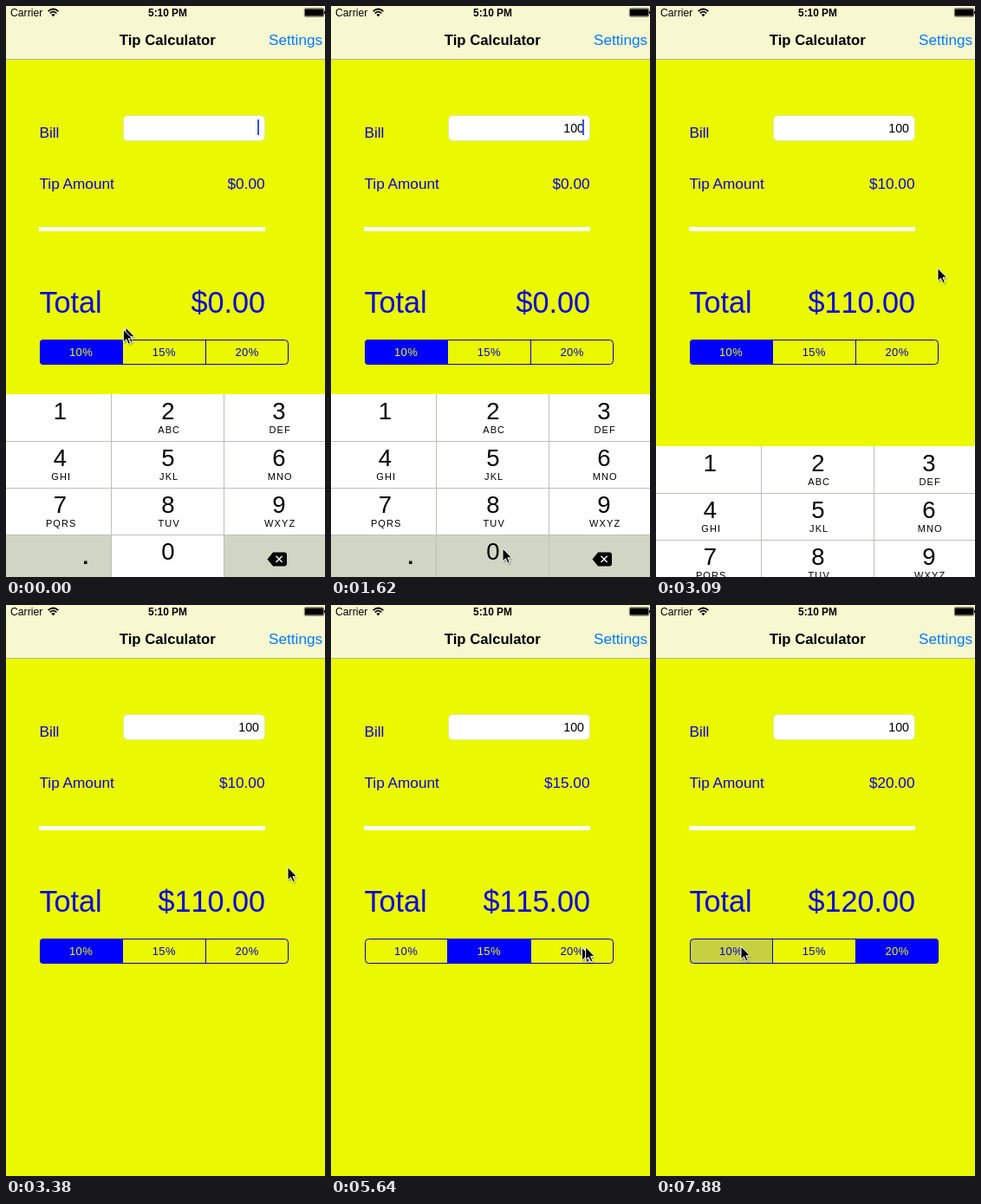
Recreate the animation shown at these times as an HTML page. Size 368 by 659 pixels, loop 8000 ms.

```html
<!DOCTYPE html>
<html lang="en">
<head>
<meta charset="utf-8">
<title>Tip Calculator</title>
<style>
html, body { margin: 0; width: 100%; height: 100%; overflow: hidden; background: #ebf900; }
svg { display: block; width: 100vw; height: 100vh; }
text { font-family: "Liberation Sans", Arial, sans-serif; }
.num { font-kerning: none; }
.end { text-anchor: end; }
.mid { text-anchor: middle; }
.label { font-size: 17.2px; fill: #0a00dc; }
.big { font-size: 34.2px; fill: #0a00dc; }
</style>
</head>
<body>
<svg viewBox="0 0 368 659">
  <defs>
    <clipPath id="segClip"><rect x="39" y="385" width="287" height="29" rx="4"/></clipPath>
    <filter id="soft" x="-50%" y="-50%" width="200%" height="200%"><feGaussianBlur stdDeviation="1"/></filter>
    <g id="arrow">
      <path d="M1 2V17L4.5 13.7L7 19L9.3 18L6.9 12.6H11.5Z" opacity=".35" filter="url(#soft)"/>
      <path d="M0 0V15L3.5 11.7L6 17.2L8.3 16.2L5.9 10.8H10.5Z" stroke="#fff"/>
    </g>
  </defs>
  <rect width="368" height="659" fill="#ebf900"/>

  <rect width="368" height="61" fill="#f7f8d0"/>
  <rect y="61" width="368" height="1" fill="#b6b591"/>
  <text x="5" y="11.6" font-size="12.2">Carrier</text>
  <path d="M48.6 6.2Q54.5 .8 60.4 6.2M50.7 8.4Q54.5 5 58.3 8.4" fill="none" stroke="#000" stroke-width="1.7"/>
  <path d="M52.4 10Q54.5 8.2 56.6 10L54.5 12.2Z"/>
  <text x="186.5" y="11.6" class="mid" font-size="11.9" font-weight="700">5:10 PM</text>
  <rect x="344.3" y="2.8" width="22.4" height="9.4" rx="1.5" fill="none" stroke="#000" stroke-width=".6"/>
  <rect x="345" y="3.5" width="21" height="8" rx=".8"/>
  <rect x="367" y="6" width="1" height="3"/>
  <text x="186.3" y="45" class="mid" font-size="16.7" font-weight="700">Tip Calculator</text>
  <text x="303" y="45" font-size="17.2" fill="#007aff">Settings</text>

  <text x="38.5" y="152" class="label">Bill</text>
  <rect x="135.5" y="126.5" width="163" height="29" rx="5" fill="#fff" stroke="#d8d9c0" stroke-width=".6"/>
  <text id="bill" x="292" y="146" class="num end" font-size="14.2"></text>
  <rect id="caret" x="290" y="131" width="2" height="18" fill="#3a52e0"/>
  <text x="38.5" y="211" class="label">Tip Amount</text>
  <text id="tip" x="298.5" y="211" class="label num end"></text>
  <rect x="38" y="255" width="261" height="5" fill="#fff"/>
  <text x="38.5" y="354" class="big">Total</text>
  <text id="total" x="299" y="354" class="big num end"></text>

  <g id="segments"></g>
  <g id="pad"></g>
  <use id="ghost" href="#arrow"/>
  <use id="cursor" href="#arrow"/>
</svg>
<script>
const LOOP = 8000, REFRESH = 58;
const $ = id => document.getElementById(id);

function add(parent, tag, attrs, text) {
  const el = document.createElementNS("http://www.w3.org/2000/svg", tag);
  for (const k in attrs) el.setAttribute(k, attrs[k]);
  if (text) el.textContent = text;
  parent.appendChild(el);
  return el;
}

// Segmented control
const SEG_W = 95.7, segBox = $("segments");
const segs = [10, 15, 20].map((rate, i) => {
  const x = 39 + SEG_W * i;
  const box = { x, y: 385, width: SEG_W, height: 29, "clip-path": "url(#segClip)" };
  return {
    press: add(segBox, "rect", { ...box, fill: "#c7d13f" }),
    fill: add(segBox, "rect", { ...box, fill: "#00f" }),
    text: add(segBox, "text", { x: x + 47.6, y: 404, class: "mid num", "font-size": 13, "letter-spacing": .4 }, rate + "%")
  };
});
add(segBox, "rect", { x: 39.5, y: 385.5, width: 286, height: 28, rx: 4, fill: "none", stroke: "#0000d8" });
for (const x of [134, 230]) add(segBox, "rect", { x, y: 386, width: 1, height: 27, fill: "#00f" });

// Number pad
const PAD_H = 211, ROW_H = 54.2, GRAY = "#d1d5c3", LINE = "#bfc1b6";
const pad = $("pad"), edges = [0, 121.5, 251.5, 368], mids = [62.5, 187, 315];
const rowY = r => 448 + ROW_H * r;
const cell = (c, r) => add(pad, "rect",
  { x: edges[c], y: rowY(r), width: edges[c + 1] - edges[c], height: ROW_H, fill: GRAY });
const digit = (n, c, r) => add(pad, "text",
  { x: mids[c], y: rowY(r) + 29 - (r == 3 ? 0.4 : 0), class: "mid num", "font-size": 27.5 }, String(n));

add(pad, "rect", { y: 448, width: 368, height: PAD_H, fill: "#fff" });
cell(0, 3);
cell(2, 3);
const keyOne = cell(0, 0), keyZero = cell(1, 3);
for (const x of edges.slice(1, 3)) add(pad, "rect", { x: x - .5, y: 448, width: 1, height: PAD_H, fill: LINE });
for (const r of [1, 2, 3]) add(pad, "rect", { y: Math.floor(rowY(r)), width: 368, height: 1, fill: LINE });

["", "ABC", "DEF", "GHI", "JKL", "MNO", "PQRS", "TUV", "WXYZ"].forEach((word, i) => {
  const c = i % 3, r = Math.floor(i / 3);
  digit(i + 1, c, r);
  add(pad, "text", { x: mids[c] + 1.2, y: rowY(r) + 45, class: "mid", "font-size": 11, "letter-spacing": 1.1 }, word);
});
digit(0, 1, 3);
add(pad, "rect", { x: 90, y: 640.5, width: 3.5, height: 3.5 });
add(pad, "path", { d: "M308 630.5H321Q324 630.5 324 633.5V643.5Q324 646.5 321 646.5H308L301.5 638.5Z" });
add(pad, "path", { d: "M311.5 634.8L318.7 642M318.7 634.8L311.5 642", stroke: "#fff", "stroke-width": 1.4 });

const ramp = (t, a, b) => Math.max(0, Math.min(1, (t - a) / (b - a)));
const easeOut = (p, power) => 1 - Math.pow(1 - p, power);
const within = (t, a, b) => t >= a && t < b;
const place = (el, x, y) => el.setAttribute("transform", `translate(${x} ${y})`);
const fade = (el, v) => el.setAttribute("opacity", Number(v));

// Cursor moves: start, end, x, y. The sideways part settles first.
const home = [138, 371];
const moves = [
  [-8, 520, 92, 452], [720, 1105, 198, 626], [1920, 2670, 325, 302.5],
  [4060, 4700, 207, 398], [5370, 5760, 295, 394], [7080, 7520, 98, 394]
];
function pose(t) {
  let [x, y] = home;
  for (const [a, b, toX, toY] of moves) {
    const p = ramp(t, a, b);
    x += (toX - x) * easeOut(p, 3.5);
    y += (toY - y) * easeOut(p, 1.5);
  }
  return [x, y];
}

const typed = [800, 1320, 1620];
const DONE = 3090;
const pressLevel = (t, up) => t < up - 110 ? 0 : 1 - ramp(t, up, up + 110);

function draw(t) {
  const keys = typed.filter(k => t >= k);
  const lastKey = keys.length ? keys[keys.length - 1] : -200;
  $("bill").textContent = "100".slice(0, keys.length);
  fade($("caret"), t < DONE && (t - lastKey) % 1000 < 500);

  const bill = t < DONE ? 0 : 100, rate = t < 5060 ? 10 : t < 6410 ? 15 : 20;
  const tip = bill * rate / 100;
  $("tip").textContent = "$" + tip.toFixed(2);
  $("total").textContent = "$" + (bill + tip).toFixed(2);

  const to15 = ramp(t, 5000, 5240), to20 = ramp(t, 6350, 6530);
  const chosen = [1 - to15, to15 - to20, to20];
  const pressed = [t >= 7880, within(t, 4940, 5240), within(t, 6240, 6530)];
  segs.forEach((s, i) => {
    const v = chosen[i];
    fade(s.fill, v);
    fade(s.press, pressed[i]);
    s.text.setAttribute("fill", `rgb(${235 * v},${249 * v},${220 * (1 - v)})`);
  });

  fade(keyOne, pressLevel(t, typed[0]));
  fade(keyZero, pressLevel(t, t < 1450 ? typed[1] : typed[2]));
  const slide = t < DONE ? 0 : easeOut(ramp(t, 3050, 3380), 2.5);
  place(pad, 0, Math.round(PAD_H * slide));

  // A moving cursor also shows where it was one refresh ago
  const now = pose(t), before = pose(t - REFRESH);
  place($("cursor"), ...now);
  place($("ghost"), ...before);
  fade($("ghost"), Math.hypot(now[0] - before[0], now[1] - before[1]) > 1);
}

const start = performance.now();
function tick() {
  draw((performance.now() - start) % LOOP);
  requestAnimationFrame(tick);
}
tick();
</script>
</body>
</html>
```
